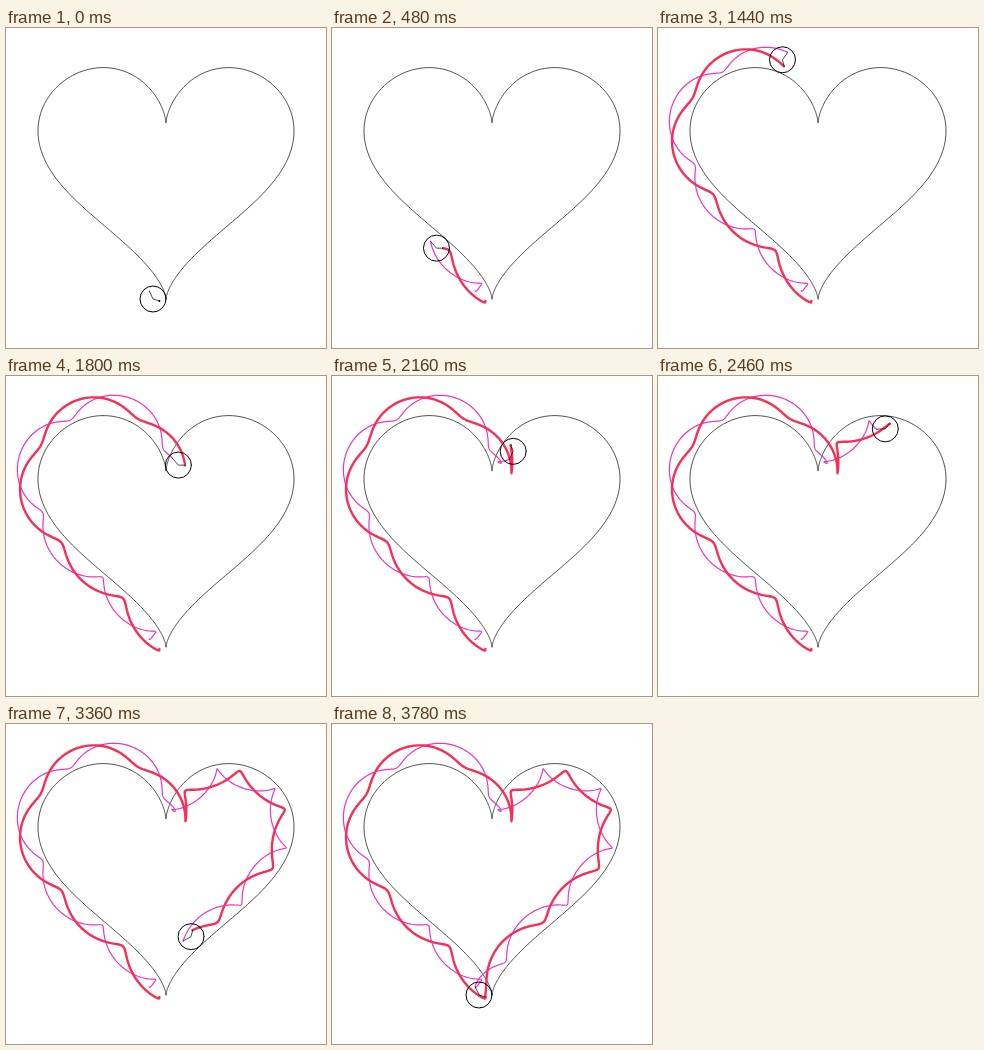
Recreate the animation shown at these times as an HTML page with a canvas. Size 320 px wide and 320 px high, loop 4.48 s.

```html
<!DOCTYPE html>
<html>
<head>
<meta charset="utf-8">
<style>
html, body { margin: 0; width: 100%; height: 100%; overflow: hidden; background: #fff; }
canvas { display: block; }
</style>
</head>
<body>
<canvas id="stage" width="320" height="320"></canvas>
<script>
const ctx = document.getElementById('stage').getContext('2d');
const { sin, cos, PI, min, max, hypot } = Math;

const RADIUS = 13, FRAMES = 63, FRAME_MS = 60, LOOP_MS = 4480;
const SUB = 8, STEPS = FRAMES * SUB, HALF = STEPS / 2;
const TURNS = 5; // wheel turns per half of the heart
const PENS = [
  { reach: 9, angle: -115, color: '#ec35c0', width: 1.2 },
  { reach: 6.7, angle: 17, color: '#f62f55', width: 2.4 },
];

// Left half of the heart, from the bottom tip (a = 0) to the notch (a = PI)
const heart = a => ({
  x: 160 - 128 * sin(a) ** 3,
  y: 135 + 8 * (13 * cos(a) + 5 * cos(2 * a) - 2 * cos(3 * a) + cos(4 * a)),
});
const velocity = a => ({
  x: -384 * sin(a) ** 2 * cos(a),
  y: -8 * (13 * sin(a) + 10 * sin(2 * a) - 6 * sin(3 * a) + 4 * sin(4 * a)),
});

const arc = [0];
for (let i = 1; i <= HALF; i++) {
  const v = velocity((i - 0.5) / HALF * PI);
  arc[i] = arc[i - 1] + hypot(v.x, v.y);
}

// The wheel runs outside the left half, then back down inside the right half
function wheelAt(step) {
  const i = min(step, STEPS - step);
  const a = min(max(i / HALF * PI, 1e-4), PI - 1e-4);
  const p = heart(a), v = velocity(a);
  const k = RADIUS / hypot(v.x, v.y);
  const nx = v.y * k, ny = -v.x * k;
  const spin = arc[i] / arc[HALF] * TURNS * 2 * PI;
  return step <= HALF
    ? { x: p.x + nx, y: p.y + ny, spin }
    : { x: 320 - p.x + nx, y: p.y - ny, spin };
}

function penAt(wheel, pen) {
  const a = wheel.spin + pen.angle * PI / 180;
  return [wheel.x + pen.reach * cos(a), wheel.y + pen.reach * sin(a)];
}

const wheels = Array.from({ length: STEPS + 1 }, (_, i) => wheelAt(i));
const outline = wheels.map((_, i) => {
  const p = heart(i / STEPS * 2 * PI);
  return [p.x, p.y];
});
const traces = PENS.map(pen => wheels.map(w => penAt(w, pen)));

function polyline(points, color, width) {
  ctx.beginPath();
  points.forEach(p => ctx.lineTo(...p));
  ctx.strokeStyle = color;
  ctx.lineWidth = width;
  ctx.stroke();
}

function disc(x, y, r) {
  ctx.beginPath();
  ctx.arc(x, y, r, 0, 2 * PI);
}

function draw(frame) {
  const step = frame * SUB, wheel = wheels[step];
  const [pinkTip, redTip] = traces.map(t => t[step]);
  ctx.clearRect(0, 0, 320, 320);
  ctx.lineJoin = ctx.lineCap = 'round';
  polyline(outline, '#000', 0.7);

  ctx.fillStyle = '#000';
  disc(...redTip, 1);
  ctx.fill();
  if (step) PENS.forEach((pen, i) =>
    polyline(traces[i].slice(0, step + 1), pen.color, pen.width));

  polyline([pinkTip, [wheel.x, wheel.y], redTip], '#000', 0.7);
  disc(wheel.x, wheel.y, RADIUS);
  ctx.lineWidth = 1;
  ctx.stroke();
}

const start = performance.now();
function tick() {
  const time = (performance.now() - start) % LOOP_MS;
  draw(min(FRAMES, Math.floor(time / FRAME_MS)));
  requestAnimationFrame(tick);
}
tick();
</script>
</body>
</html>
```
